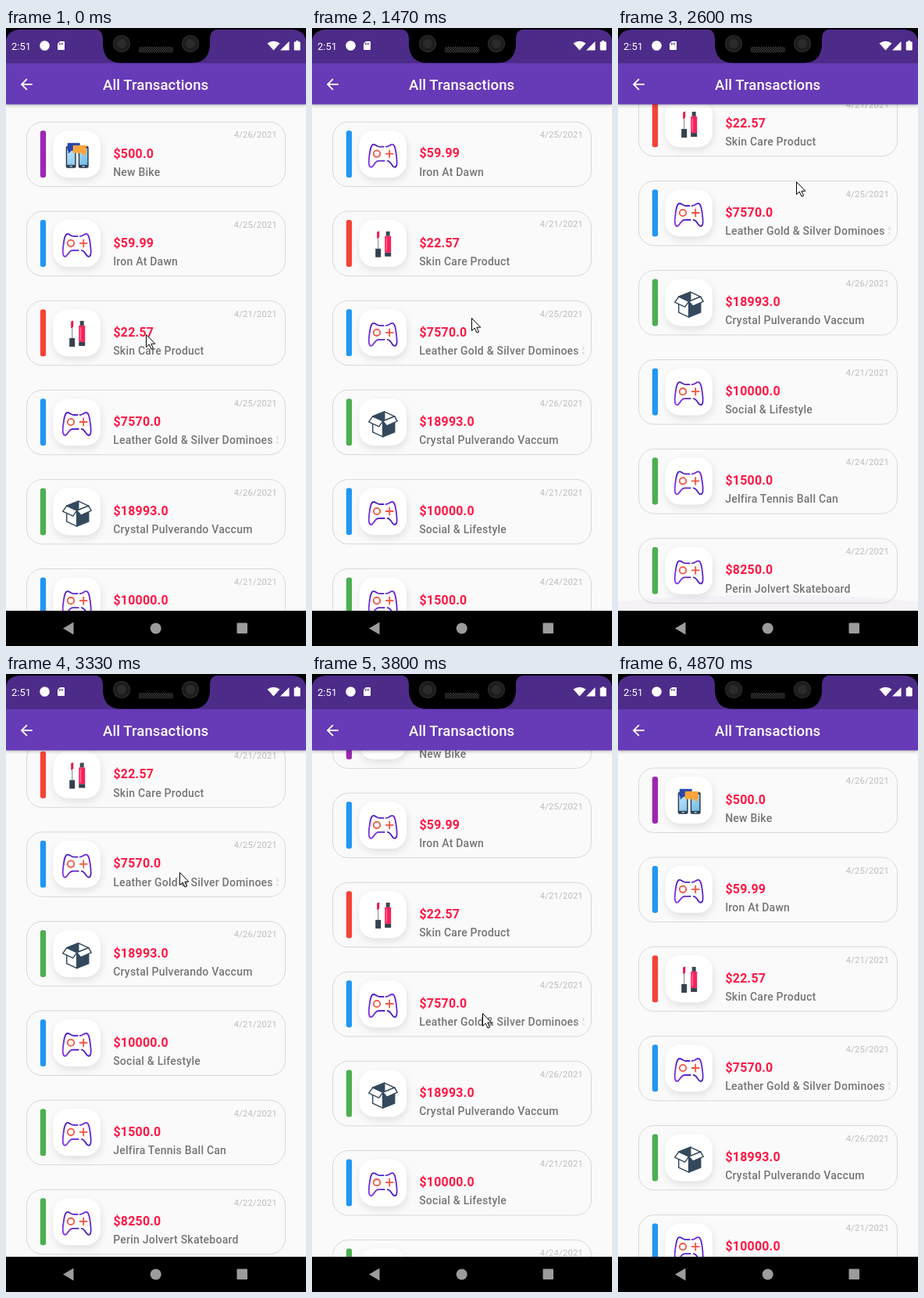
An HTML page for the animation above (5.39 s loop, 384 px wide and 789 px high).

```html
<!DOCTYPE html>
<html lang="en">
<head>
<meta charset="utf-8">
<title>All Transactions</title>
<style>
html, body { margin: 0; width: 100%; height: 100%; overflow: hidden; background: #fafafa; }
svg { display: block; width: 100%; height: 100%; }
text { font-family: Roboto, sans-serif; white-space: pre; }
.card text { letter-spacing: .23px; }
.amount { font-size: 15.9px; font-weight: 700; fill: #ff1744; }
.name { font-size: 14px; font-weight: 500; fill: url(#ink); }
.date { font-size: 11.2px; fill: #bdbdbd; text-anchor: end; }
.tile { fill: #fff; filter: drop-shadow(1px 4px 5px rgba(0, 0, 0, .1)); }
.bar { fill: #673ab7; filter: drop-shadow(0 1px 2px rgba(0, 0, 0, .3)); }
.title { font-size: 18.5px; font-weight: 500; letter-spacing: .1px; }
</style>
</head>
<body>
<svg viewBox="0 0 384 789">
  <defs>
    <linearGradient id="ink" gradientUnits="userSpaceOnUse" x1="338" x2="350" y1="0" y2="0">
      <stop stop-color="#757575"/><stop offset="1" stop-color="#757575" stop-opacity="0"/>
    </linearGradient>
    <linearGradient id="violet" gradientUnits="userSpaceOnUse" x1="-18" y1="14" x2="18" y2="-14">
      <stop stop-color="#8a35e8"/><stop offset=".5" stop-color="#4a1fc0"/><stop offset="1" stop-color="#7a2ee0"/>
    </linearGradient>
    <linearGradient id="screen" x2="1" y2="1">
      <stop stop-color="#c5e9fb"/><stop offset="1" stop-color="#6fbbe6"/>
    </linearGradient>
    <pattern id="grille" width="3" height="3" patternUnits="userSpaceOnUse">
      <path d="M0 0h1.5v1.5H0zM1.5 1.5H3V3H1.5z" fill="#444"/>
    </pattern>
    <clipPath id="view"><rect y="97" width="384" height="647"/></clipPath>

    <g id="phones">
      <g fill="#2c3e55">
        <rect x="-14" y="-11" width="13" height="28" rx="2"/>
        <rect x="2" y="-11" width="13" height="28" rx="2"/>
      </g>
      <path d="M-12.5-8h10v21h-10zM3.5-8h10v21h-10z" fill="url(#screen)"/>
      <path d="M-9 15h3M7 15h3" stroke="#fff"/>
      <path d="M-11-15H3q1 0 1 1v8q0 1-1 1H-7l-4 4v-4q-1 0-1-1v-8q0-1 1-1z" fill="#2746ad"/>
      <path d="M-4-12H11q1 0 1 1v8q0 1-1 1v4l-5-4H-4q-1 0-1-1v-8q0-1 1-1z" fill="#fba53c"/>
    </g>
    <g id="pad" fill="none" stroke-width="1.800" stroke-linecap="round">
      <path stroke="url(#violet)" d="M4-10C8-10 9-13 12-13C15.500-13 16.500-6 17.500 3C18.500 12 18 16 15 16C11.500 16 11 8.500 6 8M2 8H-5C-11 8-11.500 16-15 16C-18 16-18.500 11-17.500 3C-16.500-5-15.500-13-12-13C-9-13-8-10-4-10H1"/>
      <path stroke="#f05340" d="M4-1h9M8.500-5.500v9"/>
      <circle cx="-7.700" cy="-1" r="4.200" stroke="#f05340"/>
    </g>
    <g id="gloss">
      <path d="M-7.500-15.500l3-1v7.500l-1.500 2h-1.500z" fill="#e5174d"/>
      <path d="M-6-7V6" stroke="#8795a1" stroke-width="1.200"/>
      <path d="M-9.500 6h7v11h-7z" fill="#34424f"/>
      <path d="M4-16h5v6H4z" fill="#3a4855"/>
      <path d="M2.500-10h8v21h-8z" fill="#f8205a"/>
      <path d="M4-8h1.500V9H4z" fill="#ff7196"/>
      <path d="M2.500 11h8v5h-8z" fill="#34424f"/>
    </g>
    <g id="box" stroke="#34495e" stroke-width="1.500" stroke-linejoin="round">
      <path d="M-13-8L2-14L15-8L0-2z" fill="#fff"/>
      <path d="M-13-8L2-14V-3L0-2z" fill="#34495e"/>
      <path d="M-13-8V12L0 18V-2z" fill="#fff"/>
      <path d="M0-2L15-8V12L0 18z" fill="#34495e"/>
      <path d="M-13-8L-18-1L-5 5L0-2z" fill="#fff"/>
      <path d="M15-8L18.500-2L5 4L0-2z" fill="#fff"/>
    </g>
  </defs>

  <rect width="384" height="789" fill="#fafafa"/>
  <g clip-path="url(#view)">
    <g id="list"></g>
    <g fill="#673ab7"><ellipse id="topGlow" cx="192" rx="576"/><ellipse id="endGlow" cx="192" rx="576"/></g>
  </g>

  <rect class="bar" width="384" height="97.500"/>
  <rect width="384" height="45" fill="#4d2b89"/>
  <path d="M0 0H384V15Q381 3 367 2H17Q3 3 0 15z"/>
  <path d="M111 1C121 2 123 5 124 13V22C125 37 133 44.500 147 44.500H238C252 44.500 260 37 261 22V13C262 5 264 2 274 1z"/>
  <g fill="#1d1d1d" stroke="#2b2b2b" stroke-width="1.200">
    <circle cx="148" cy="20" r="10.500"/><circle cx="236" cy="20" r="10.500"/>
    <circle cx="148" cy="20" r="5.500" fill="#2c2b2a"/><circle cx="236" cy="20" r="5.500" fill="#2c2b2a"/>
  </g>
  <rect x="170" y="24" width="44" height="7.500" rx="2" fill="url(#grille)"/>
  <g fill="#fff">
    <text x="7" y="27.500" font-size="13">2:51</text>
    <circle cx="49.500" cy="22.500" r="6.300"/>
    <path d="M69 17h5q1 0 1 1v9q0 1-1 1h-7q-1 0-1-1V20z"/>
    <path d="M68.500 19v2.500M70.500 19v2.500M72.500 19v2.500" stroke="#4d2b89"/>
    <path d="M334.500 19.500Q342.500 14 350.500 19.500L342.500 28.500z"/>
    <path d="M362.500 17V28.500H351z"/>
    <path d="M369.500 17.500h1.800v-1.500h2.800v1.500h1.800q.8 0 .8.800V27.700q0 .8-.8.800h-6.400q-.8 0-.8-.8V18.300q0-.8.800-.8z"/>
    <path transform="translate(15 60.800) scale(.934)" d="M20 11H7.830l5.590-5.590L12 4l-8 8 8 8 1.410-1.410L7.830 13H20v-2z"/>
    <text class="title" x="124" y="78.500">All Transactions</text>
  </g>

  <rect y="744" width="384" height="45"/>
  <g fill="#9c9c9c">
    <path d="M73 766.500L86.500 758.500V774.500z"/>
    <circle cx="191.700" cy="766.500" r="7"/>
    <rect x="295.500" y="759.500" width="13.500" height="13.500" rx="1"/>
  </g>
  <path id="cursor" d="M.5.500V16.500L4.200 13L7 19L9.500 18L6.800 12.200H11.800z" fill="#fff" stroke="#000"/>
</svg>
<script>
const $ = id => document.getElementById(id);
const LOOP = 5390, STEP = 200 / 3, PITCH = 114.1;
const purple = '#9c27b0', blue = '#2196f3', red = '#f44336', green = '#4caf50';

const items = [
  ['500.0', 'New Bike', 26, purple, 'phones'],
  ['59.99', 'Iron At Dawn', 25, blue, 'pad'],
  ['22.57', 'Skin Care Product', 21, red, 'gloss'],
  ['7570.0', 'Leather Gold &amp; Silver Dominoes S', 25, blue, 'pad'],
  ['18993.0', 'Crystal Pulverando Vaccum', 26, green, 'box'],
  ['10000.0', 'Social &amp; Lifestyle', 21, blue, 'pad'],
  ['1500.0', 'Jelfira Tennis Ball Can', 24, green, 'pad'],
  ['8250.0', 'Perin Jolvert Skateboard', 22, green, 'pad']
];

$('list').innerHTML = items.map(([amount, name, day, color, icon], i) => `
  <g class="card" transform="translate(0 ${119.7 + i * PITCH})">
    <rect x="26.500" y=".3" width="331" height="82.500" rx="20" fill="none" stroke="#d8d8d8"/>
    <rect x="43.800" y="11.300" width="7.300" height="60" rx="3" fill="${color}"/>
    <rect class="tile" x="60.500" y="11.300" width="60.500" height="60" rx="19"/>
    <use href="#${icon}" x="90.700" y="42"/>
    <text class="date" x="347" y="20.800">4/${day}/2021</text>
    <text class="amount" x="137.500" y="45.900">$${amount}</text>
    <text class="name" x="137.200" y="69.200">${name}</text>
  </g>`).join('');

const scrollKeys = [[1200, 0], [1333, 50], [1733, 234], [1900, 267], [3200, 267], [3333, 260.5], [3800, 82], [4233, 0]];
const endKeys = [[1867, 0], [2267, 1], [2400, 1], [2600, .5], [2933, 0]];
const topKeys = [[4200, 0], [4400, .8], [4800, 0]];
const cursorKeys = [
  [67, 179, 391], [267, 206, 224], [667, 206, 224], [1000, 202, 521], [1200, 201, 462],
  [1733, 210, 281], [1900, 217, 237], [2400, 229, 185], [2600, 228, 196], [2933, 225, 229],
  [3067, 225, 229], [3333, 222, 253], [3800, 218, 433], [4233, 212, 518], [4533, 185, 612],
  [4800, 143, 782], [4867, 130, 830]
];

// Smooth curve through the keys that never overshoots them
function track(keys, t, k = 1) {
  const last = keys.length - 1;
  if (t <= keys[0][0]) return keys[0][k];
  if (t >= keys[last][0]) return keys[last][k];
  const i = keys.findIndex(key => key[0] > t) - 1;
  const slope = j => j < 0 || j >= last ? 0 : (keys[j + 1][k] - keys[j][k]) / (keys[j + 1][0] - keys[j][0]);
  const tangent = j => {
    const a = slope(j - 1), b = slope(j);
    return a * b > 0 ? 2 * a * b / (a + b) : 0;
  };
  const [a, b] = [keys[i], keys[i + 1]], d = b[0] - a[0], u = (t - a[0]) / d, v = 1 - u;
  return v * v * (1 + 2 * u) * a[k] + u * u * (3 - 2 * u) * b[k]
    + d * u * v * (v * tangent(i) - u * tangent(i + 1));
}

function glow(el, edge, side, g) {
  const scale = .54 * g;
  el.setAttribute('cy', edge + side * 499 * scale);
  el.setAttribute('ry', 576 * scale);
  el.setAttribute('opacity', .08 * g);
}

function draw(now) {
  const t = Math.floor((now % LOOP + 5) / STEP) * STEP;
  $('list').setAttribute('transform', `translate(0 ${-track(scrollKeys, t)})`);
  $('cursor').setAttribute('transform',
    `translate(${Math.round(track(cursorKeys, t))} ${Math.round(track(cursorKeys, t, 2))})`);
  glow($('endGlow'), 744, 1, track(endKeys, t));
  glow($('topGlow'), 97, -1, track(topKeys, t));
}

let start;
function tick(now) {
  start ??= now;
  draw(now - start);
  requestAnimationFrame(tick);
}
draw(0);
requestAnimationFrame(tick);
</script>
</body>
</html>
```
